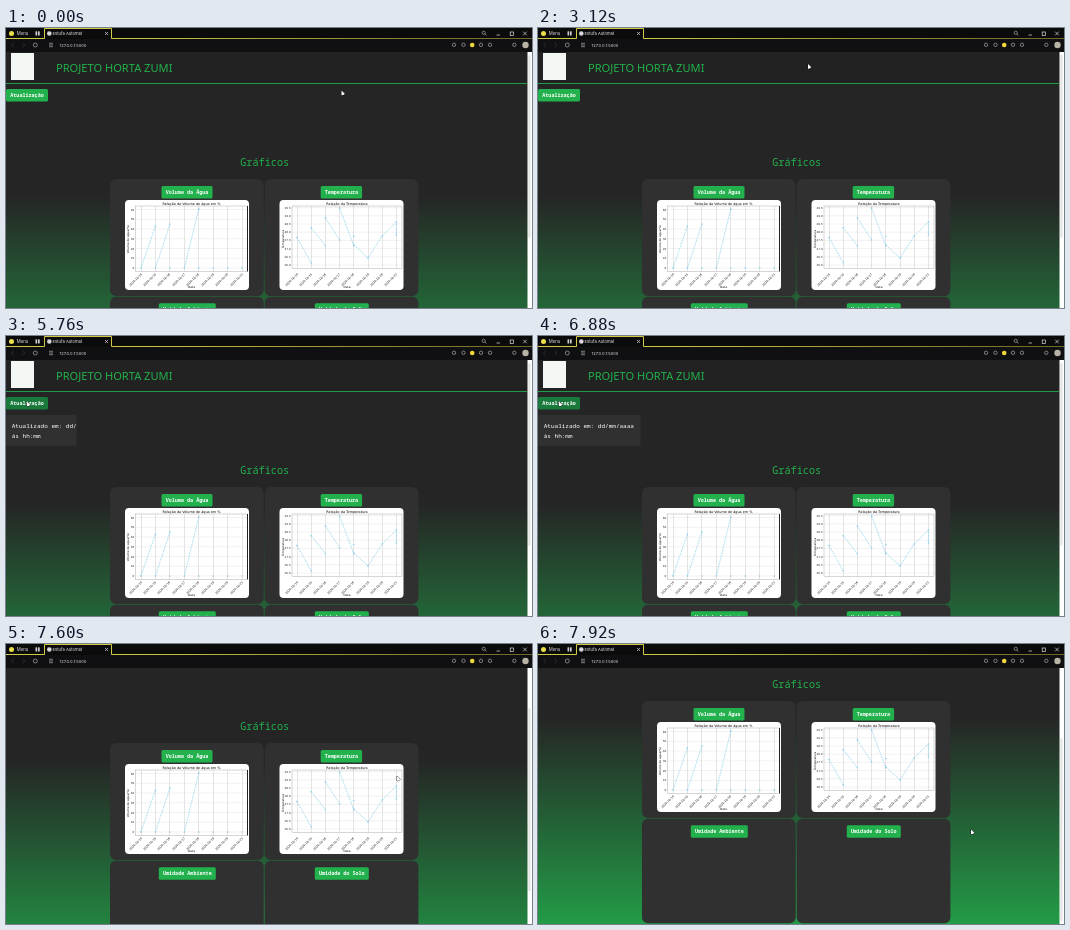
Recreate the animation shown at these times as an HTML page with a canvas. Size 526 px wide and 280 px high, loop 8000 ms.

```html
<!DOCTYPE html>
<html lang="pt-BR">
<head>
<meta charset="utf-8">
<title>Painel</title>
<style>
html, body { margin: 0; width: 100%; height: 100%; overflow: hidden; background: #252525; }
canvas { display: block; width: 526px; height: 280px; }
</style>
</head>
<body>
<canvas id="stage"></canvas>
<script>
const W = 526, H = 280, LOOP = 8000, TOP = 24, DOC = 358;
const GREEN = '#22b14c', CARD = '#303030', SKY = '#87ceeb', ACCENT = '#e9df4a', ICON = '#aaa';
const MONO = '"Noto Sans Mono", "DejaVu Sans Mono", monospace';
const SANS = '"Noto Sans", "Open Sans", sans-serif';
const PLOT = '"DejaVu Sans", sans-serif';
const UI = 'Inter, Roboto, sans-serif';

const canvas = document.getElementById('stage');
const ratio = window.devicePixelRatio || 1;
canvas.width = W * ratio;
canvas.height = H * ratio;
const c = canvas.getContext('2d');

const clamp = v => Math.min(1, Math.max(0, v));
const smooth = u => u * u * (3 - 2 * u);

// CSS "ease" curve, solved by bisection
function ease(x) {
  if (x <= 0 || x >= 1) return clamp(x);
  const bez = (u, a, b) => 3 * u * (1 - u) * ((1 - u) * a + u * b) + u ** 3;
  let lo = 0, hi = 1;
  for (let i = 0; i < 24; i++) {
    const mid = (lo + hi) / 2;
    if (bez(mid, .25, .25) < x) lo = mid; else hi = mid;
  }
  return bez(lo, .1, 1);
}

// Pointer moves: start, duration, destination
const MOVES = [
  [2900, 60, 270, 36], [3900, 340, 12, 26], [4640, 860, 21, 65.5],
  [6080, 100, 21, 76], [6520, 100, 21, 65.5],
  [6960, 600, 391, 132], [7620, 280, 433, 185.5]
];
function pointerAt(t) {
  let x = 335.5, y = 62.5;
  for (const [start, span, toX, toY] of MOVES) {
    const u = smooth(clamp((t - start) / span));
    x += (toX - x) * u;
    y += (toY - y) * u;
  }
  return [x, y];
}

// Hover periods of the update button
const HOVERS = [[5640, 6120], [6600, 7000]];
const openness = t => Math.max(...HOVERS.map(([on, off]) =>
  t < off ? ease((t - on) / 300) : 1 - ease((t - off) / 300)));

const scrollAt = t => Math.round(94 * (1 - (1 - clamp((t - 7440) / 480)) ** 2));

function rect(x, y, w, h, fill, r = 0) {
  c.fillStyle = fill;
  c.beginPath();
  c.roundRect(x, y, w, h, r);
  c.fill();
}
function text(s, x, y, font, fill, align = 'left') {
  c.font = font;
  c.fillStyle = fill;
  c.textAlign = align;
  c.fillText(s, x, y);
}
function turned(s, x, y, angle, align) {
  c.save();
  c.translate(x, y);
  c.rotate(angle);
  text(s, 0, 0, `2.9px ${PLOT}`, '#111', align);
  c.restore();
}
function line(pts, stroke, width = .7) {
  c.strokeStyle = stroke;
  c.lineWidth = width;
  c.beginPath();
  pts.forEach(p => c.lineTo(...p));
  c.stroke();
}
function disc(x, y, r, fill) {
  c.fillStyle = fill;
  c.beginPath();
  c.arc(x, y, r, 0, 7);
  c.fill();
}
function ring(x, y, r, stroke = ICON) {
  c.strokeStyle = stroke;
  c.lineWidth = .7;
  c.beginPath();
  c.arc(x, y, r, 0, 7);
  c.stroke();
}
function cross(x, y, r) {
  for (const s of [-r, r]) line([[x - r, y - s], [x + r, y + s]], '#ddd');
}
const chevron = (x, d) => line([[x - d, 14.8], [x + d, 17], [x - d, 19.2]], '#3a3a3a');

function button(label, x, y, w, h, fill = GREEN) {
  rect(x, y, w, h, fill, 1.5);
  text(label, x + w / 2, y + h / 2 + 1.8, `bold 5.08px ${MONO}`, '#fff', 'center');
}

// Lines take points as [tick index, y]
function chart({ x, left, first, step, title, unit, rows, rowStep, label, lines, dots }) {
  const right = x + 122.5, mid = (left + right) / 2, bottom = rows[0] + 3.5;
  const at = ([i, y]) => [first + i * step, y];
  rect(x, 172, 124, 90, '#fff', 4);
  text(title, mid, 176.6, `3.4px ${PLOT}`, '#000', 'center');
  for (let i = 0; i < rows[1]; i++) {
    const y = rows[0] - i * rowStep;
    line([[left, y], [right, y]], '#ddd', .4);
    text(label(i), left - 1.2, y + 1, `2.8px ${PLOT}`, '#222', 'right');
  }
  for (let i = 0; i < 8; i++) {
    const gx = Math.floor(first + i * step) + .5;
    line([[gx, 178], [gx, bottom]], '#c8c8c8', .5);
    turned('2024-10-' + (14 + i), gx + .8, 246.5, -Math.PI / 4, 'right');
  }
  c.strokeStyle = '#999';
  c.lineWidth = .4;
  c.strokeRect(left, 178, right - left, bottom - 178);
  text('Data', mid, 260.3, `2.9px ${PLOT}`, '#111', 'center');
  turned(unit, x + 4.4, 211, -Math.PI / 2, 'center');
  c.setLineDash([2, .8]);
  lines.forEach(pts => line(pts.map(at), SKY, .65));
  c.setLineDash([]);
  [...lines.flat(), ...dots].forEach(p => disc(...at(p), .8, SKY));
}

const WATER = {
  x: 119, left: 129.5, first: 135, step: 14.45, rows: [240, 7], rowStep: 9.75,
  title: 'Relação da Volume de água em %', unit: 'Volume de água(%)',
  label: i => String(i * 10),
  lines: [0, 1, 3].map(i => [[i, 240], [i + 1, 198 - 1.9 * i * i]]),
  dots: [2, 4, 5, 6, 7].map(i => [i, 240])
};
const HEAT = {
  x: 273.5, left: 286, first: 291, step: 14.2, rows: [237, 8], rowStep: 8.2,
  title: 'Relação da Temperatura', unit: 'Temperatura',
  label: i => (26 + i / 2).toFixed(1),
  lines: [
    ...[0, 1, 2, 3].map(i => [[i, 209.5 - 9.8 * i], [i + 1, 212 + 5.7 * (i - 2) ** 2]]),
    [[4, 217], [5, 230], [6, 208], [7, 194], [7, 207]]
  ],
  dots: [[4, 208.5]]
};

function panel(open) {
  c.save();
  c.beginPath();
  c.rect(0, 79, 103 * open, 31);
  c.clip();
  rect(0, 79, 103 * open, 31, CARD, [0, 2, 2, 0]);
  ['Atualizado em: dd/mm/aaaa', 'às hh:mm'].forEach((s, i) =>
    text(s, 5.7, 92 + 10 * i, `6.03px ${MONO}`, '#fff'));
  c.restore();
}

function page(t) {
  const scroll = scrollAt(t);
  c.save();
  c.beginPath();
  c.rect(0, TOP, W, H - TOP);
  c.clip();
  c.translate(0, -scroll);

  const bg = c.createLinearGradient(0, TOP, 0, TOP + DOC);
  bg.addColorStop(.4, '#252525');
  bg.addColorStop(1, '#22a048');
  rect(0, TOP, W, DOC, bg);

  rect(0, TOP, W, 31, '#222');
  rect(5, 25, 23, 27, '#f3f8f5');
  text('PROJETO HORTA ZUMI', 50, 43.8, `11.1px ${SANS}`, GREEN);
  rect(0, 55, 521, 1, '#219a49');

  const hover = HOVERS.some(([on, off]) => t >= on - 60 && t < off);
  button('Atualização', 0, 61, 42, 12.5, hover ? '#1a7a3c' : GREEN);
  panel(openness(t));

  text('Gráficos', 258.7, 137.6, `10.2px ${MONO}`, GREEN, 'center');
  for (const x of [104, 258.7]) {
    rect(x, 151, 153.7, 117, CARD, 6);
    rect(x, 268.8, 153.7, 104.5, CARD, 6);
  }
  button('Volume da Água', 155.5, 158, 51, 12.5);
  button('Temperatura', 314.7, 158, 41.4, 12.5);
  button('Umidade Ambiente', 152.8, 275.3, 57, 12.5);
  button('Umidade do Solo', 308.8, 275.3, 54, 12.5);
  chart(WATER);
  line([[241.5, 178], [241.5, 243.5]], '#222', 1);
  chart(HEAT);
  c.restore();

  rect(521.5, TOP, 4.5, H - TOP, '#fff');
  rect(522.3, 27 + scroll * .715, 2.2, 183, '#e4e4e4', 1);
}

function browserBar() {
  rect(0, 0, W, TOP, '#0b0b0c');
  rect(0, 11, W, 13, '#101012');
  const fade = c.createLinearGradient(105, 0, W, 0);
  fade.addColorStop(0, ACCENT);
  fade.addColorStop(1, '#77722c');
  line([[0, 10.5], [38.5, 10.5], [38.5, .5], [105.5, .5], [105.5, 10.5], [W, 10.5]], fade, .9);

  disc(5.5, 5.5, 2.5, ACCENT);
  text('Menu', 10.7, 7.2, `4.4px ${UI}`, '#ddd');
  for (const x of [29.5, 32]) rect(x, 3.2, 1.7, 4.4, '#ccc', .5);
  disc(43.3, 5.5, 2.3, '#d8d8d8');
  text('Estufa Automat', 46.6, 7.2, `4.1px ${UI}`, '#e8e8e8');
  cross(100.5, 5.5, 1.5);

  ring(477.7, 4.8, 1.6);
  line([[479, 6], [480.5, 7.5]], ICON);
  line([[490.5, 7], [494, 7]], '#ddd');
  c.strokeRect(504.2, 4, 3.4, 3.4);
  cross(519, 5.5, 1.8);

  chevron(6.7, -1.2);
  chevron(17.7, 1.2);
  ring(29.3, 17, 2);
  for (const y of [15.3, 17, 18.7]) line([[43, y], [47, y]], ICON);
  text('127.0.0.1:5000', 53.5, 18.6, `4.1px ${UI}`, '#ddd');

  for (const x of [448, 457.5, 475, 484, 508.3]) ring(x, 16.8, 1.7);
  disc(466.2, 17, 2.3, '#f0d83a');
  disc(519.5, 17, 3.2, '#b9b2a6');
}

function pointer([x, y]) {
  c.save();
  c.translate(x, y);
  c.fillStyle = '#fff';
  line([[0, 0], [0, 4.8], [1.8, 4.6], [3.3, 3.3], [0, 0]], '#111', .8);
  c.fill();
  c.restore();
}

const start = performance.now();
function tick() {
  const t = (performance.now() - start) % LOOP;
  c.setTransform(ratio, 0, 0, ratio, 0, 0);
  page(t);
  browserBar();
  pointer(pointerAt(t));
  requestAnimationFrame(tick);
}
tick();
</script>
</body>
</html>
```
